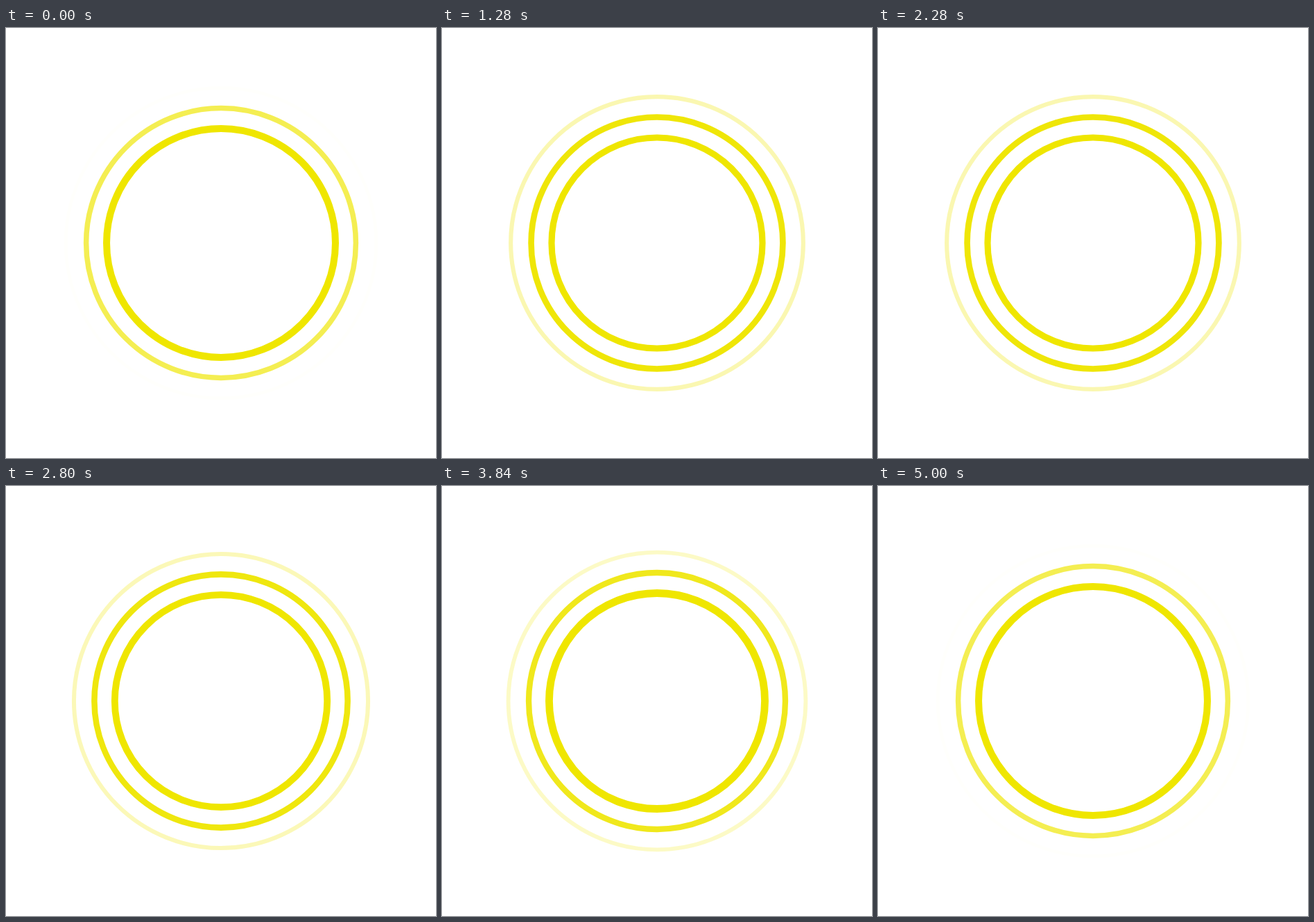
Write an HTML page that moves like this. It is 620 by 620 pixels and loops after 5.04 s.

```html
<!DOCTYPE html>
<html lang="en">
<head>
<meta charset="utf-8">
<title>Ripple rings</title>
<style>
  html, body { margin: 0; width: 100%; height: 100%; overflow: hidden; background: #fff; }
  svg { display: block; width: 100vw; height: 100vh; }
</style>
</head>
<body>
<svg viewBox="0 0 620 620">
  <g fill="none" stroke="#efe600">
    <circle cx="310" cy="310"/>
    <circle cx="310" cy="310"/>
    <circle cx="310" cy="310"/>
  </g>
</svg>
<script>
  const LOOP = 5040, STEP = 40;
  const LIFE = 1500, GAP = 500, LAG = 8;
  const PEAK = 0.22;
  const rings = [...document.querySelectorAll("circle")];

  // Quick swell from nothing, then a slow thinning.
  function strokeWidth(u) {
    const full = 5 + 7.5 * (1 - u);
    return u < PEAK ? full * u / PEAK : full;
  }

  function draw(time) {
    const t = Math.floor((time % LOOP) / STEP) * STEP;
    rings.forEach((ring, i) => {
      const u = ((t - LAG + i * GAP + LIFE) % LIFE) / LIFE;
      ring.setAttribute("r", 136 + 88.3 * u);
      ring.setAttribute("stroke-width", strokeWidth(u));
      ring.setAttribute("stroke-opacity", Math.min(1, 2 * (1 - u)));
    });
  }

  function tick() {
    draw(performance.now() - start);
    requestAnimationFrame(tick);
  }

  const start = performance.now();
  draw(0);
  requestAnimationFrame(tick);
</script>
</body>
</html>
```
